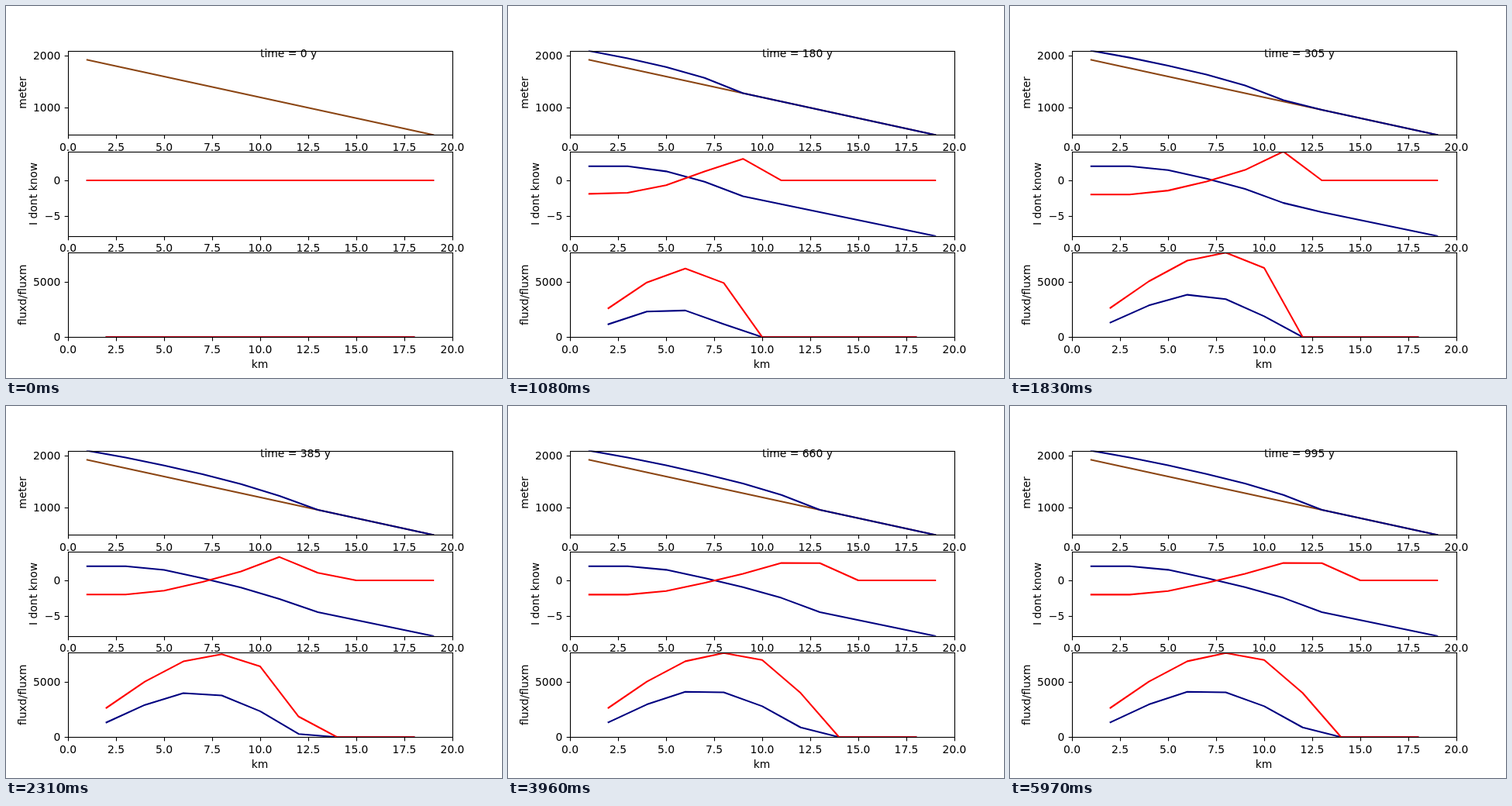
These frames come from a looping animation (640x480 px, 6 s). An HTML page with a canvas:

```html
<!DOCTYPE html>
<html>
<head>
<meta charset="utf-8">
<style>
html, body { margin: 0; width: 100%; height: 100%; overflow: hidden; background: #fff; }
canvas { display: block; }
</style>
</head>
<body>
<canvas id="stage" width="640" height="480"></canvas>
<script>
const ctx = document.getElementById('stage').getContext('2d');
const STEPS = 200, FRAME_MS = 30, DT = 5, DX = 2000, CELLS = 10;
const BROWN = '#8b4513', NAVY = '#000080', RED = '#ff0000';

// Glacier flow line: ice thickness on a sloping bed, driven by mass balance.
const cells = Array.from({ length: CELLS }, (_, i) => 2 * i + 1);
const edges = cells.slice(1).map(x => x - 1);
const bed = cells.map(x => 2000 - 80 * x);
const DRIVE = (910 * 9.81) ** 3 * 365 * 86400;
const SLIDE = 5.7e-20 * DRIVE, DEFORM = 0.4 * 1.9e-24 * DRIVE;

function describe(ice) {
  const surface = bed.map((z, i) => z + ice[i]);
  const balance = surface.map(z => Math.min(2, 0.007 * (z - 1600)));
  const flux = (k, power) => edges.map((_, i) =>
    k * ((surface[i] - surface[i + 1]) / DX) ** 3 * (ice[i] ** power + ice[i + 1] ** power) / 2);
  const slide = flux(SLIDE, 3), deform = flux(DEFORM, 5);
  const total = i => (slide[i] || 0) + (deform[i] || 0);
  const gain = cells.map((_, i) => (total(i - 1) - total(i)) / DX);
  return { surface, balance, slide, deform, gain };
}

const states = [];
let ice = cells.map(() => 0);
for (let n = 0; n < STEPS; n++) {
  const s = describe(ice);
  states.push(s);
  ice = ice.map((h, i) => Math.max(0, h + DT * (s.balance[i] + s.gain[i])));
}
// Nothing has been computed yet at time zero.
states[0].surface = null;
states[0].balance = cells.map(() => 0);

const LEFT = 80, WIDTH = 496, HEIGHT = 108.706;
const panels = [
  { top: 57.6, min: 480, max: 2097, ticks: [1000, 2000], label: 'meter', labelX: 26,
    lines: s => [[cells, bed, BROWN], [cells, s.surface, NAVY]] },
  { top: 188.047, min: -7.84, max: 4.05, ticks: [-5, 0], label: 'I dont know', labelX: 40,
    lines: s => [[cells, s.balance, NAVY], [cells, s.gain, RED]] },
  { top: 318.494, min: 0, max: 7650, ticks: [0, 5000], label: 'fluxd/fluxm', labelX: 26,
    lines: s => [[edges, s.deform, NAVY], [edges, s.slide, RED]] }
];

const snap = v => Math.floor(v + 0.5) + 0.5;
const px = x => LEFT + x / 20 * WIDTH;
const py = (p, v) => p.top + (p.max - v) / (p.max - p.min) * HEIGHT;

function text(str, x, y, align) {
  ctx.textAlign = align;
  ctx.fillText(str, x, y);
}

function segment(x1, y1, x2, y2) {
  ctx.beginPath();
  ctx.moveTo(x1, y1);
  ctx.lineTo(x2, y2);
  ctx.stroke();
}

function plot(p, xs, ys, color) {
  ctx.strokeStyle = color;
  ctx.beginPath();
  xs.forEach((x, i) => ctx.lineTo(px(x), py(p, ys[i])));
  ctx.stroke();
}

function drawPanel(p, state) {
  const bottom = p.top + HEIGHT;
  ctx.save();
  ctx.beginPath();
  ctx.rect(LEFT, p.top, WIDTH, HEIGHT);
  ctx.clip();
  ctx.lineWidth = 2.083;
  ctx.lineCap = 'square';
  ctx.lineJoin = 'round';
  for (const [xs, ys, color] of p.lines(state)) if (ys) plot(p, xs, ys, color);
  ctx.restore();

  ctx.lineWidth = 1.11;
  ctx.strokeStyle = '#000';
  const x0 = snap(LEFT), y0 = snap(p.top), y1 = snap(bottom);
  ctx.strokeRect(x0, y0, WIDTH, y1 - y0);
  for (let x = 0; x <= 20; x += 2.5) {
    const tx = snap(px(x));
    segment(tx, y1, tx, y1 + 4.86);
    text(x.toFixed(1), px(x), Math.round(bottom + 20.5), 'center');
  }
  for (const v of p.ticks) {
    const ty = snap(py(p, v));
    segment(x0, ty, x0 - 4.86, ty);
    text(String(v).replace('-', '\u2212'), 70.3, Math.round(py(p, v)) + 5, 'right');
  }
  ctx.save();
  ctx.translate(p.labelX, p.top + HEIGHT / 2);
  ctx.rotate(-Math.PI / 2);
  text(p.label, 0, 0, 'center');
  ctx.restore();
}

function draw(now) {
  const n = Math.floor(now / FRAME_MS) % STEPS;
  ctx.fillStyle = '#fff';
  ctx.fillRect(0, 0, 640, 480);
  ctx.fillStyle = '#000';
  ctx.font = '13.889px "DejaVu Sans", sans-serif';
  for (const p of panels) drawPanel(p, states[n]);
  text('km', 327.5, 467, 'center');
  text(`time = ${n * DT} y`, 328, 66, 'left');
  requestAnimationFrame(draw);
}
requestAnimationFrame(draw);
</script>
</body>
</html>
```
